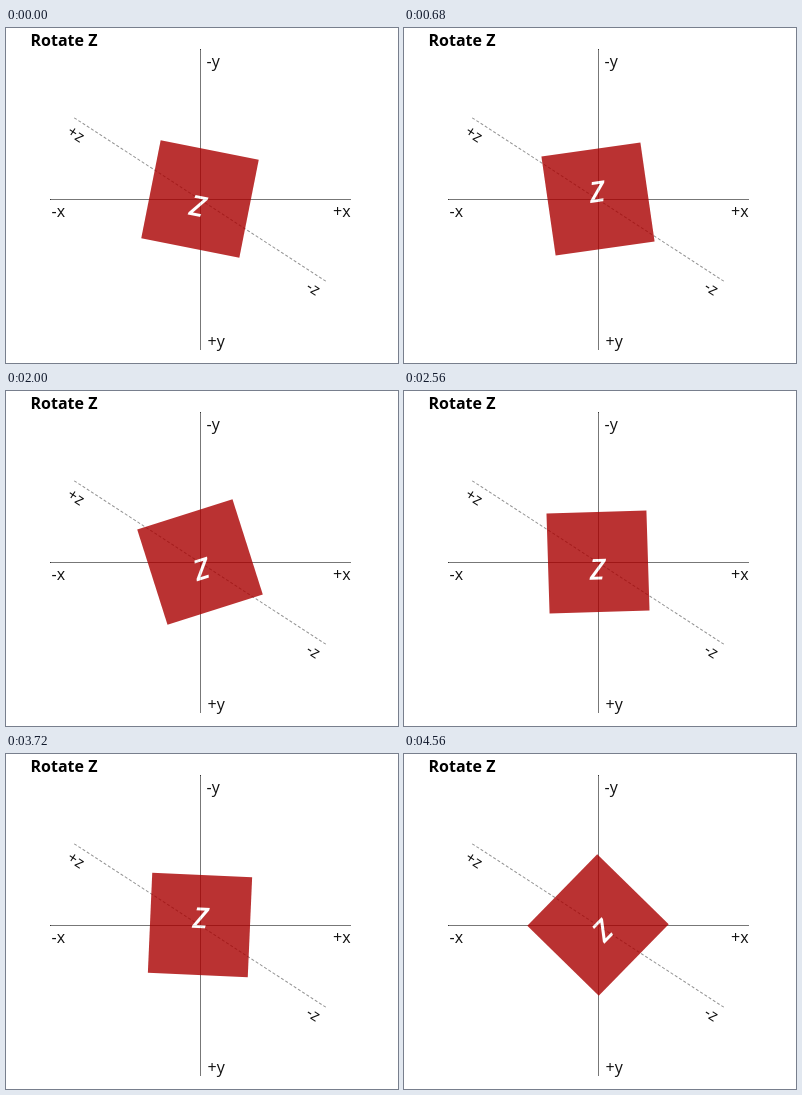
An HTML page for the animation above (4640 ms loop, 392 by 335 pixels).

```html
<!DOCTYPE html>
<html lang="en">
<head>
<meta charset="utf-8">
<title>Rotate Z</title>
<style>
  html, body { margin: 0; width: 100%; height: 100%; overflow: hidden; background: #fff; }
  svg { display: block; width: 392px; height: 335px; }
  text { font: 16px "Open Sans", "Noto Sans", sans-serif; fill: #111; }
  .title { font-weight: 700; fill: #000; }
  .axis { stroke: #777; }
  .tip { stroke: #333; }
  .dashed { stroke-dasharray: 3 2.034; stroke-opacity: .8; }
  #card { opacity: .8; }
  #card rect { fill: #a00; }
  #card text { font-size: 28.8px; font-style: italic; font-weight: 600; fill: #fff; text-anchor: middle; }
</style>
</head>
<body>
<svg viewBox="0 0 392 335">
  <text class="title" x="24.5" y="17.5">Rotate Z</text>
  <path class="axis" d="M44 171.5H345M194.5 21V322"/>
  <path class="tip" d="M44 171.5h1M194.5 21v1"/>
  <text x="200.5" y="39">-y</text>
  <text x="201.5" y="319">+y</text>
  <text x="45.5" y="189">-x</text>
  <text x="327" y="189">+x</text>
  <g transform="translate(194 171.5) rotate(33)">
    <path class="axis dashed" d="M-150 0H150"/>
    <text x="-148" y="18">+z</text>
    <text x="137" y="18">-z</text>
  </g>
  <g id="card">
    <rect x="-50" y="-50" width="100" height="100"/>
    <text y="3">Z</text>
  </g>
</svg>
<script>
  const LOOP = 4640, STEPS = 60;
  const TURN = 3000;              // ms per full eased turn
  const START = 144, TICK = 78.05; // turn time at the first step, and per step
  const card = document.getElementById('card');

  const bezier = (a, b, s) => 3 * a * s * (1 - s) ** 2 + 3 * b * s * s * (1 - s) + s ** 3;

  // The CSS "ease" curve, solved by bisection.
  function ease(x) {
    let lo = 0, hi = 1;
    for (let i = 0; i < 30; i++) {
      const mid = (lo + hi) / 2;
      if (bezier(.25, .25, mid) < x) lo = mid; else hi = mid;
    }
    return bezier(.1, 1, lo);
  }

  function draw(now) {
    const t = now % LOOP;
    const step = Math.min(STEPS - 1, Math.floor(t / LOOP * STEPS + .25));
    const turn = (START + step * TICK) / TURN % 1;
    card.setAttribute('transform', `translate(194 171) rotate(${180 + 360 * ease(turn)})`);
  }

  const origin = performance.now();
  function frame() {
    draw(performance.now() - origin);
    requestAnimationFrame(frame);
  }
  frame();
</script>
</body>
</html>
```
